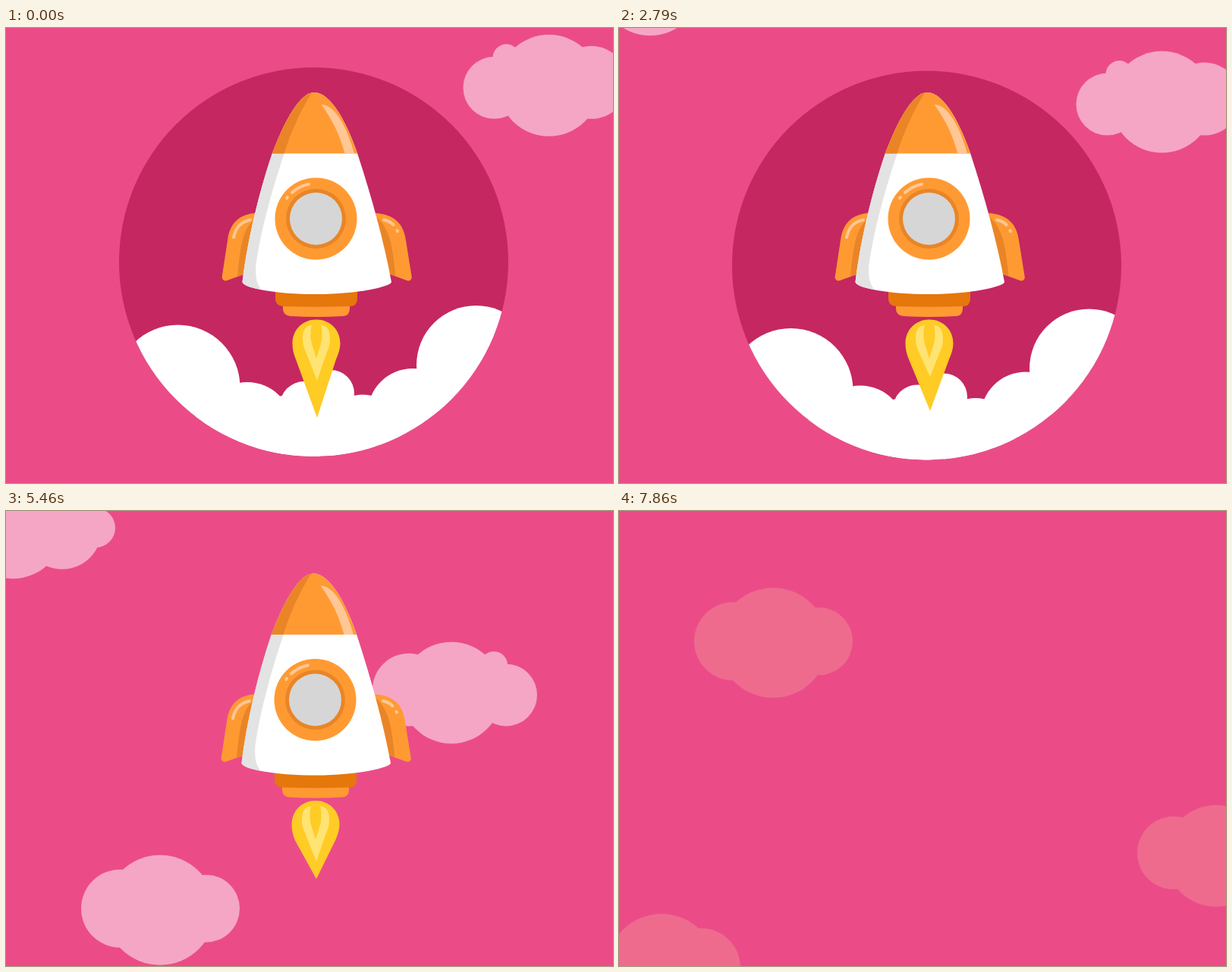
Write an HTML page with a canvas that moves like this. It is 800 px wide and 600 px high and loops after 7.89 s.

```html
<!DOCTYPE html>
<html lang="en">
<head>
<meta charset="utf-8">
<title>Rocket launch</title>
<style>
html, body { margin: 0; width: 100%; height: 100%; overflow: hidden; background: #eb4c88; }
canvas { display: block; width: 800px; height: 600px; }
</style>
</head>
<body>
<canvas id="stage" width="800" height="600"></canvas>
<script>
const ctx = document.getElementById('stage').getContext('2d');
const LOOP = 7890, STEP = 30, POSTER = 2760;
const PINK = '#eb4c88', DARK = '#c52761', ORANGE = '#ff9a33', SHADE = '#e98526';
const RUST = '#e5770b', GLOW = '#ffc795', YELLOW = '#ffcb25', PALE = '#ffe373';

const clamp = x => Math.max(0, Math.min(1, x));
const part = (t, a, b) => clamp((t - a) / (b - a));
const mix = (a, b, k) => a + (b - a) * k;
const easeOut = x => 1 - (1 - x) ** 3;
const easeInOut = x => x * x * (3 - 2 * x);
const wave = (t, period) => Math.cos((t - POSTER) / period * 2 * Math.PI);
const bump = (t, mid, half) => easeInOut(clamp(1 - Math.abs(t - mid) / half));

function disc(x, y, r, color) {
  ctx.fillStyle = color;
  ctx.beginPath();
  ctx.arc(x, y, Math.max(0, r), 0, 7);
  ctx.fill();
}
function fill(path, color) {
  ctx.fillStyle = color;
  ctx.fill(new Path2D(path));
}
function line(path, color, width) {
  ctx.strokeStyle = color;
  ctx.lineWidth = width;
  ctx.lineCap = 'round';
  ctx.stroke(new Path2D(path));
}

// Each cloud shape is a main disc at 0,0 with smaller lobes: [dx, dy, radius]
const SHAPES = {
  a: [[0, 0, 67], [-72, 3, 41], [-56, -36.5, 18], [56, -4, 48]],
  b: [[0, 0, 67], [65, 2.5, 52], [109, 0, 26], [-60, 5.5, 48]],
  c: [[0, 0, 72.5], [-52.5, -2, 51.5], [60.5, -2, 44.5]]
};
// One letter per cloud, from the bottom of the strip up; capitals are mirrored
const ORDER = 'abCaBCAcAb';
const SPOTS = [
  [715.5, 816], [41, 661.5], [744, 411], [208, 202], [677, 35],
  [56, -263], [787, -412], [203, -693], [587, -979.5], [9, -1197]
];
const STRIP = 2490, SPEED = 0.7257;

function drawClouds(t) {
  const shift = (t - 3780) * SPEED + 396 * part(t, 6900, 7860) ** 2;
  const fade = part(t, 7500, 7860);
  const color = `rgb(${mix(245, 238, fade)},${mix(166, 107, fade)},${mix(197, 142, fade)})`;
  SPOTS.forEach(([x, base], i) => {
    const letter = ORDER[i], shape = letter.toLowerCase();
    const flip = letter === shape ? 1 : -1;
    for (const y of [base + shift, base + shift - STRIP])
      for (const [dx, dy, r] of SHAPES[shape]) disc(x + dx * flip, y + dy, r, color);
  });
}

// Smoke comes in three bursts of puffs: [x, y, full radius]
const BURSTS = [
  { start: 1200, puffs: [[281, 569, 72.5], [421, 583, 77.5], [568, 581, 66], [375, 525, 50],
    [470, 526.5, 51.5], [318, 518, 59.5], [536, 500, 59.5], [420, 510, 30]] },
  { start: 1378, puffs: [[428, 473.5, 31], [393, 489.5, 32]] },
  { start: 1737, puffs: [[226.5, 465, 82], [619.5, 436, 78.5]] }
];

function drawSmoke(t) {
  for (const { start, puffs } of BURSTS)
    puffs.forEach(([x, y, r], i) => {
      // the last, outer pair opens one after the other
      const from = start + (start > 1500 ? i * 67 - 33 : 0);
      disc(x, y, r * easeOut(part(t, from, from + 1000)), '#fff');
    });
}

function drawPad(t) {
  const drop = 0.48 * (Math.max(0, t - 2634) / 30) ** 2;
  if (drop > 560) return;
  const r = t < 1800
    ? 520 * easeInOut(part(t, 0, 600))
    : mix(520, 256.5, easeInOut(part(t, 1800, 2600)));
  ctx.save();
  ctx.translate(0, drop);
  disc(405.5, 300, r, DARK);
  ctx.beginPath();
  ctx.arc(405.5, 300, r, 0, 7);
  ctx.clip();
  drawSmoke(t);
  ctx.restore();
}

function drawFlame(t) {
  const tip = 499 + 15 * wave(t, 162.5);
  const core = 457 + 8 * wave(t, 159.2);
  fill(`M409 384.5C427 384.5 440.5 398 440.5 416C440.5 423 438 430 435 437L410 ${tip}
    L382 437C379 430 377.5 423 377.5 416C377.5 398 391 384.5 409 384.5Z`, YELLOW);
  fill(`M402 392C394 393 391 400 391 409C391 417 393 422 395 427L410 ${core}
    L423 427C426 421 427 416 427 409C427 400 424 393 416 392Z`, PALE);
  fill('M403 391H415C417 399 417 410 415 416L409 436L403 416C401 410 401 399 403 391Z', YELLOW);
}

const BODY = `M351 165C368 120 388 85 406 85C426 85 446 117 463 165
  C482 223 498 281 508 335C507 341 464 351 409.5 351C355 351 313 343 311.5 335
  C318 281 333 218 351 165Z`;

function drawFins() {
  fill(`M330 244C309 245 295 256 292 280L284.7 328C284.3 332 288 334 291 333
    L316 324Z`, ORANGE);
  fill('M328 252C313 264 309 283 305 327.5L316 324Z', SHADE);
  line('M300 276C303 263 309 256 322 253', GLOW, 4);
  fill(`M487 244C511 246 524 257 527 280L534.7 328C535.2 332 532 334 528.5 333
    L504 324Z`, ORANGE);
  fill('M488 249C505 264 509 283 513.5 327.5L504 324Z', SHADE);
  line('M498 253C503 254 507 256 510.5 259.5M515.5 267L516 268', GLOW, 4);
}

function drawHull() {
  fill('M365 364H453V370Q453 380 443 380Q409 382 375 380Q365 379 365 370Z', ORANGE);
  fill('M355 346H463V357Q463 367 453 367Q409 368.5 365 367Q355 366 355 357Z', RUST);
  fill(BODY, '#fff');
  ctx.save();
  ctx.clip(new Path2D(BODY));
  fill('M367 165C350 214 335 272 329.5 312C328 330 331 342 343 352H300V165Z', '#e3e3e3');
  fill('M340 80H470V165.5H340Z', ORANGE);
  fill('M404 84C389 107 376 136 366.5 165.5H340V84Z', SHADE);
  ctx.restore();
  fill('M415.5 101C433 101 449 129 459 165.5H446.5C440 142 431 122 415.5 101Z', GLOW);
}

function drawWindow() {
  disc(408.5, 251.5, 54, ORANGE);
  disc(408.5, 251.5, 39.5, SHADE);
  disc(408.5, 251.5, 34.5, '#d6d6d6');
  line('M377 217A46.7 46.7 0 0 1 399 206M370 224.5L371 223.3', GLOW, 4);
}

function drawRocket(t) {
  // slow sway while flying
  const sway = -4 * (1 - easeInOut(part(t, 1800, 2760)))
    - 2.3 * easeInOut(part(t, 2790, 3780)) + 1.3 * bump(t, 5460, 1400);
  const lift = -2.5 * bump(t, 5460, 850) - 0.5 * (1 - part(t, 1800, 2760));
  const enter = 540 * (1 - easeOut(part(t, 300, 1200)));
  const leave = 560 * part(t, 7050, 7650) ** 3;
  ctx.save();
  ctx.translate(sway, lift + enter - leave);
  drawFlame(t);
  drawFins();
  drawHull();
  drawWindow();
  ctx.restore();
}

function draw(t) {
  ctx.fillStyle = PINK;
  ctx.fillRect(0, 0, 800, 600);
  drawClouds(t);
  drawPad(t);
  drawRocket(t);
}

function tick() {
  const t = Math.floor(performance.now() % LOOP / STEP) * STEP;
  draw(t || POSTER); // the loop opens on a still of the launch
  requestAnimationFrame(tick);
}
tick();
</script>
</body>
</html>
```
